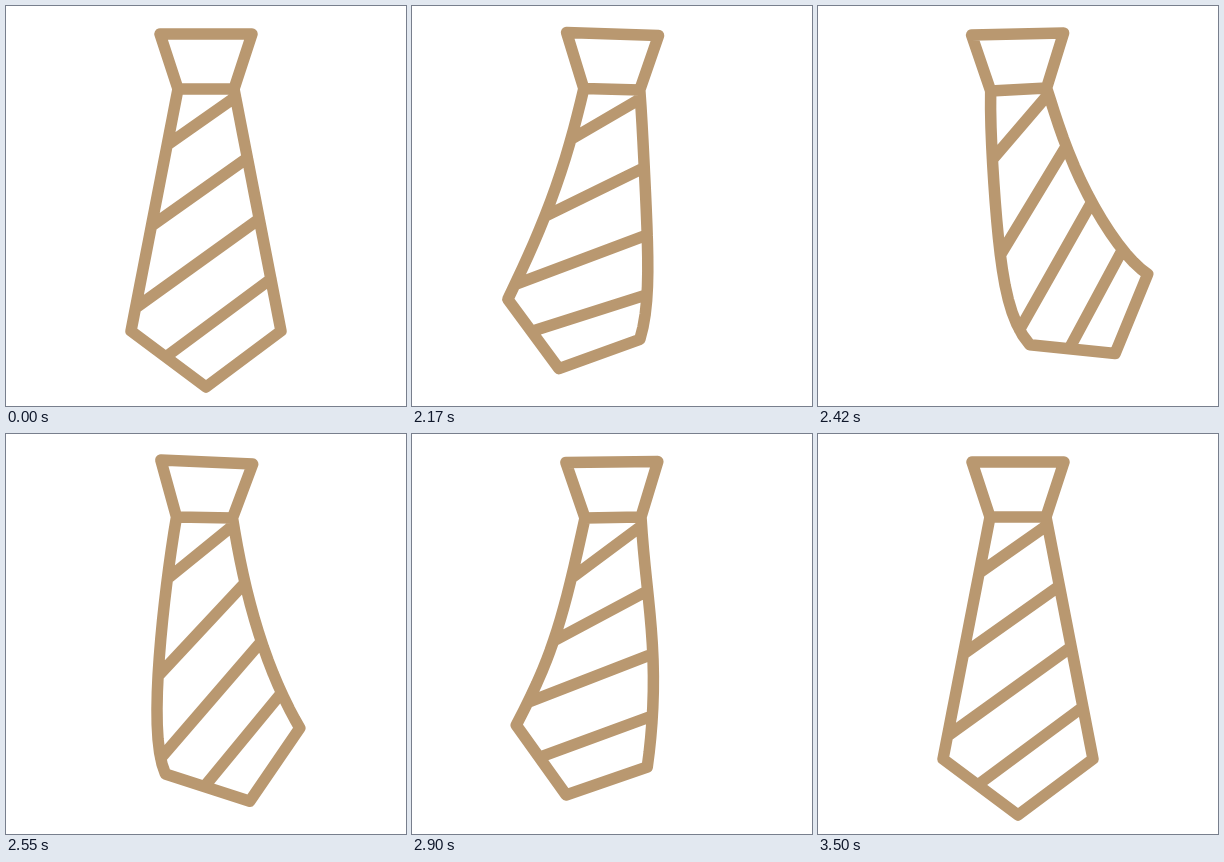
Recreate the animation shown at these times as an HTML page. Size 400 by 400 pixels, loop 3.52 s.

```html
<!DOCTYPE html>
<html lang="en">
<head>
<meta charset="utf-8">
<title>Tie</title>
<style>
html, body { margin: 0; width: 100%; height: 100%; overflow: hidden; background: #fff; }
svg { display: block; width: 100%; height: 100%; }
path { fill: none; stroke: #b99870; stroke-width: 11.5; stroke-linecap: round; stroke-linejoin: round; }
</style>
</head>
<body>
<svg viewBox="0 0 400 400"><path id="tie"/></svg>
<script>
const LOOP = 3520, START = 2020;
const TOP = 83;
// Heights below the knot at which a pose is defined.
const NODES = [0, 62, 137, 242];

// A pose: knot tilt, then dx, dy, tilt and scale at each node.
const REST = [0, 0, 0, 0, 1, 0, 0, 0, 1, 0, 0, 0, 1, 0, 0, 0, 1];
const NUDGE = [0, 0, 0, 0, 1, -.5, 0, 0, 1, -1, 0, 0, 1, -2, 0, 0, 1];
const RISE = [4.9, 3, .5, 7, 1, 6.4, 3.5, 8.2, .97, 11.8, 5, 6.5, .985, 15, -2, -1.6, .973];
const BACK = [-2.5, -1.5, .5, -1, 1, -1, 2, 7.5, .97, 5, 8, 15, 1, 27, -8, 19, .947];
const LEFT = [.6, 1, .5, 1, 1, -3.6, 4.5, 0, .96, -8.8, -3, -11.5, .93, -30.5, -13, -17.8, .917];
const RIGHT = [0, .5, .5, 3, 1, 4.5, 1, 9.1, .96, 13, 2.5, 11.5, .975, 31, -9.5, 13.6, .935];

// The right-hand pose made stronger, or mirrored when w is negative.
function swing(w, knot) {
  const size = Math.abs(w);
  return RIGHT.map((v, i) => {
    if (i === 0) return knot;
    const kind = (i - 1) % 4;
    if (kind === 3) return 1 - (1 - v) * Math.min(size, 1.3);
    return v * (kind === 1 ? size : w) * (i < 5 ? .4 : 1);
  });
}

const KEYS = [
  [2000, REST], [2020, NUDGE], [2160, swing(-1.25, -2)], [2300, RISE],
  [2430, swing(2.3, 1)], [2550, BACK], [2765, swing(-1.9, -.5)],
  [2900, LEFT], [3120, RIGHT], [3160, swing(1.12, 0)], [3500, REST]
];

function slope(i, p) {
  return (KEYS[i + 1][1][p] - KEYS[i][1][p]) / (KEYS[i + 1][0] - KEYS[i][0]);
}

function tangent(i, p) {
  if (i === 0 || i === KEYS.length - 1) return 0;
  const a = slope(i - 1, p), b = slope(i, p);
  return a * b <= 0 ? 0 : 2 * a * b / (a + b);
}

function poseAt(t) {
  if (t < START || t >= 3500) return REST;
  let i = 0;
  while (t >= KEYS[i + 1][0]) i++;
  const [t0, a] = KEYS[i], [t1, b] = KEYS[i + 1];
  const d = t1 - t0, u = (t - t0) / d, v = 1 - u;
  return a.map((from, p) =>
    from * (1 + 2 * u) * v * v + b[p] * (3 - 2 * u) * u * u +
    d * u * v * (tangent(i, p) * v - tangent(i + 1, p) * u));
}

function weights(h) {
  return NODES.map((n, i) => NODES.reduce((w, m, j) =>
    i === j ? w : w * (h - m) / (n - m), 1));
}

function turn(x, y, deg) {
  const a = deg * Math.PI / 180, c = Math.cos(a), s = Math.sin(a);
  return [x * c + y * s, y * c - x * s];
}

// Moves a point of the resting tie with the cloth.
function bend(pose, x, y) {
  const h = Math.min(y - TOP, 242), w = weights(h);
  const [dx, dy, tilt, scale] = [1, 2, 3, 4].map(k =>
    w.reduce((sum, v, i) => sum + v * pose[k + 4 * i], 0));
  const [px, py] = turn((x - 200) * scale, (y - TOP - h) * scale, tilt);
  return [200 + dx + px, TOP + h + dy + py];
}

const edge = (side, y) => [200 + side * (28 + 47 * (y - TOP) / 242), y];
const STRIPES = [
  [edge(1, 91), edge(-1, 139)], [edge(1, 152), edge(-1, 220)],
  [edge(1, 213), edge(-1, 302)], [edge(1, 273), [161, 350]]
];
const line = pts => "M" + pts.map(p => p.map(n => n.toFixed(2)).join(" ")).join("L");

function draw(t) {
  const pose = poseAt(t), move = p => bend(pose, ...p);
  const left = [], right = [];
  for (let i = 0; i <= 16; i++) {
    const y = TOP + 242 * i / 16;
    left.push(move(edge(-1, y)));
    right.unshift(move(edge(1, y)));
  }
  const knot = [-46, 46].map(x => {
    const [a, b] = turn(x, 0, pose[0]);
    return [200 - .3 * pose[0] + a, 28 + b];
  });
  const d = [
    line([left[0], ...knot, right[16]]) + "Z",
    line([...left, move([200, 381]), ...right]),
    ...STRIPES.map(s => line(s.map(move)))
  ];
  document.getElementById("tie").setAttribute("d", d.join(""));
}

const begin = performance.now();
function frame() {
  draw((performance.now() - begin) % LOOP);
  requestAnimationFrame(frame);
}
frame();
</script>
</body>
</html>
```
